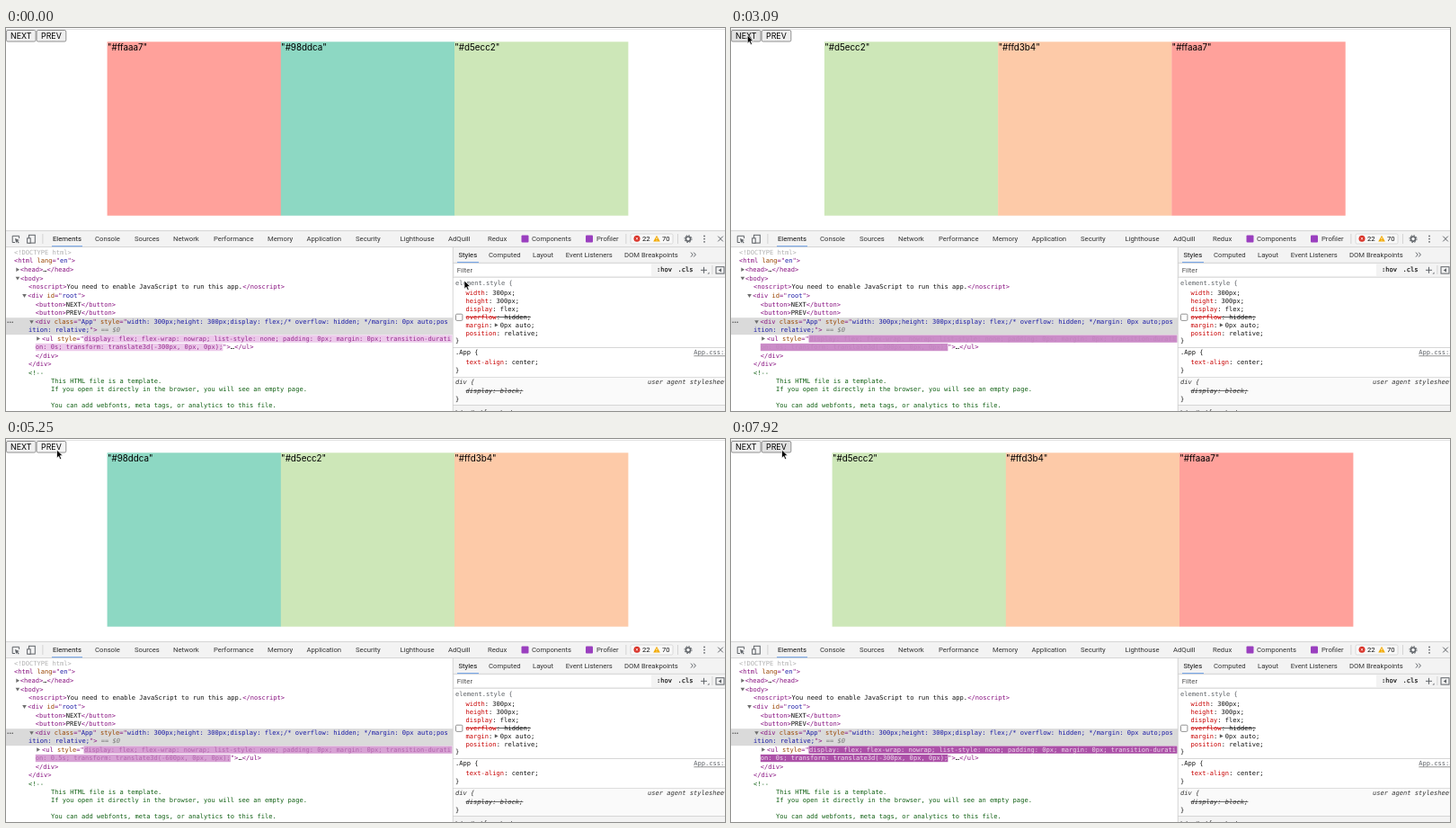
Recreate the animation shown at these times as an HTML page. Size 800 by 426 pixels, loop 8 s.

```html
<!DOCTYPE html>
<html lang="en">
<head>
<meta charset="utf-8">
<title>Carousel in the inspector</title>
<style>
html, body { margin: 0; width: 100%; height: 100%; overflow: hidden; background: #fff; }
svg { display: block; width: 800px; height: 426px; }
text { white-space: pre; }
.m { font: 7.07px "DejaVu Sans Mono", monospace; }
.u { font: 7.7px Roboto, sans-serif; fill: #333; }
.b { font: 8.8px Inter, sans-serif; fill: #000; }
.l { font: 9.8px Inter, sans-serif; fill: #000; }
.k { fill: #111; }
.p { fill: #881280; }
.n { fill: #994500; }
.v { fill: #1a1aa6; }
.g { fill: #b0b0b0; }
.e { fill: #777; font-style: italic; }
.c { fill: #0f5f12; }
.r { fill: #c80000; }
.s { fill: #5f6368; }
.i { font-style: italic; fill: #333; }
.x { text-decoration: line-through; }
.o { fill: none; stroke: #5f6368; stroke-width: 1; }
</style>
</head>
<body>
<svg id="stage" viewBox="0 0 800 426" xmlns="http://www.w3.org/2000/svg"></svg>
<script>
const stage = document.getElementById('stage');
const LOOP = 8000, SLIDE = 500, PRESS = 185, LAG = 230;
const SIDE = 193.2, LEFT = 112.6, CHAR = 7.07 * 0.602;
const ITEMS = [['#ffaaa7', '#ffa19b'], ['#98ddca', '#8dd8c3'], ['#d5ecc2', '#cde7b8'], ['#ffd3b4', '#fdcaa8']];
// [start, direction]: 1 is NEXT, -1 is PREV
const CLICKS = [[1220, 1], [2123, 1], [3060, 1], [3770, 1], [4680, 1], [5375, -1], [6220, -1], [7140, -1]];

const esc = s => s.replace(/&/g, '&amp;').replace(/</g, '&lt;');
const text = (cls, x, y, s, more = '') => `<text class="${cls}" x="${x}" y="${y}" ${more}>${esc(s)}</text>`;
const rect = (x, y, w, h, fill, more = '') => `<rect x="${x}" y="${y}" width="${w}" height="${h}" fill="${fill}" ${more}/>`;
const hline = (x, y, w, c = '#ccc') => rect(x, y, w, 0.8, c);
const vline = (x, y, h, c = '#ccc') => rect(x, y, 0.8, h, c);
// runs are split by "|"; the first letter of each is its colour class
const code = (x, cy, runs, more = '') => `<text class="m" x="${x}" y="${cy + 2.4}">` +
  runs.split('|').map(r => `<tspan class="${r[0]} ${more}">${esc(r.slice(1))}</tspan>`).join('') + '</text>';
const right = (x, y) => `<path d="M${x} ${y - 2.3}l3.8 2.3l-3.8 2.3z" fill="#6e6e6e"/>`;
const down = (x, y) => `<path d="M${x} ${y - 1.7}h4.6l-2.3 3.8z" fill="#6e6e6e"/>`;
const button = (id, x, s) => rect(x + 0.4, 2.5, 32.7, 12.5, '#efefef', `id="${id}" rx="1.6" stroke="#767676" stroke-width=".8"`) +
  text('b', x + 16.7, 12, s, 'text-anchor="middle"');
const underline = (x, y, w) => rect(x, y, w, 1, '#6b9fe6');

function page() {
  return rect(0, 0, 800, 426, '#fff') + hline(0, 1.2, 800, '#dcdcdc') +
    '<g id="list">' + [0, 1, 2].map(i =>
      rect(i * SIDE, 15.3, SIDE + 0.2, SIDE + 0.2, '#fff', 'class="tile"') +
      text('l', i * SIDE + 0.3, 25.4, '', 'data-tile="1"')).join('') + '</g>' +
    button('next', 0, 'NEXT') + button('prev', 33.7, 'PREV');
}

function toolbar() {
  const tabs = [[52, 'Elements'], [99, 'Console'], [143, 'Sources'], [186, 'Network'], [231, 'Performance'],
    [291, 'Memory'], [334.5, 'Application'], [389, 'Security'], [438.5, 'Lighthouse'], [492, 'AdQuill'],
    [536, 'Redux'], [585, 'Components'], [657, 'Profiler']];
  return rect(0, 225.5, 800, 18, '#f3f3f3') + hline(0, 225.2, 800) + hline(0, 243.2, 800) +
    '<path class="o" d="M10 238.5H7.2V231.3H14.6V234"/><path d="M10 234l5 2l-2.1.8l1.8 1.9l-.9.8l-1.8-1.9l-.8 1.8z" fill="#5f6368"/>' +
    '<rect class="o" x="25.5" y="230.3" width="6.8" height="8.8"/>' +
    rect(23.6, 233.8, 3.6, 5.4, '#f3f3f3', 'stroke="#5f6368"') +
    vline(40.5, 229, 11) +
    tabs.map(([x, s]) => text(x === 52 ? 'u k' : 'u', x, 237.2, s)).join('') +
    underline(51, 242.2, 34) +
    rect(573.5, 230.5, 8, 8, '#9a3fbf', 'rx="1"') + rect(645, 230.5, 8, 8, '#9a3fbf', 'rx="1"') +
    vline(689.5, 229, 11) + rect(695, 229, 47, 11, '#f8f8f8', 'rx="1.5" stroke="#cfcfcf" stroke-width=".7"') +
    '<circle cx="702" cy="234.3" r="3.5" fill="#d93025"/><path d="M700.7 233l2.6 2.6m0-2.6l-2.6 2.6" stroke="#fff" stroke-width=".8"/>' +
    text('u k', 708, 237.2, '22') +
    '<path d="M724 230.8l3.8 6.7h-7.6z" fill="#f2a900"/><path d="M724 233v2.2m0 .7v.8" stroke="#fff" stroke-width=".8"/>' +
    text('u k', 730, 237.2, '70') + vline(747, 229, 11) +
    '<circle class="o" cx="759" cy="234.6" r="2.6" style="stroke-width:1.6"/><circle class="o" cx="759" cy="234.6" r="4" stroke-dasharray="1.6 1.54"/>' +
    [231.4, 234.6, 237.8].map(y => `<circle cx="777" cy="${y}" r=".9" fill="#5f6368"/>`).join('') +
    '<path class="o" d="M792.2 231.6l5.6 5.8m0-5.8l-5.6 5.8"/>';
}

function elements() {
  return rect(0, 322.2, 497, 19, '#dadada') +
    [2.2, 4.7, 7.2].map(x => `<circle cx="${x}" cy="327.3" r=".8" fill="#555"/>`).join('') +
    code(9, 249.5, 'g<!DOCTYPE html>') +
    code(9, 259, 'p<html |nlang|p="|ven|p">') +
    right(11.3, 268.8) + code(15.7, 268.8, 'p<head>|k…|p</head>') +
    down(10.6, 278.5) + code(16, 278.5, 'p<body>') +
    code(25, 288, 'p<noscript>|kYou need to enable JavaScript to run this app.|p</noscript>') +
    down(18.2, 297.8) + code(24.3, 297.8, 'p<div |nid|p="|vroot|p">') +
    code(32.8, 307.4, 'p<button>|kNEXT|p</button>') +
    code(32.8, 317, 'p<button>|kPREV|p</button>') +
    down(26.2, 327) +
    code(32.6, 327, 'p<div |nclass|p="|vApp|p" |nstyle|p="|vwidth: 300px;height: 300px;display: flex;/* overflow: hidden; */margin: 0px auto;pos') +
    code(25, 336, 'vition: relative;|p">|e == $0') +
    right(34.2, 345.5) + code(40, 345.5, 'p<ul |nstyle|p="') +
    rect(86.5, 341.5, 410, 8.3, '#fff', 'class="glow"') + rect(32.8, 350.9, 10, 8.3, '#fff', 'class="glow" id="glow2"') +
    text('m', 86.9, 347.9, 'display: flex; flex-wrap: nowrap; list-style: none; padding: 0px; margin: 0px; transition-durati', 'data-flash="1"') +
    text('m', 32.8, 357.2, '', 'data-flash="1" id="style2"') +
    '<g id="tail">' + code(0, 354.8, 'p">|k…|p</ul>') + '</g>' +
    code(32.8, 364.4, 'p</div>') + code(25, 374, 'p</div>') + code(25, 383.5, 'c<!--') +
    code(50, 393, 'cThis HTML file is a template.') +
    code(50, 402, 'cIf you open it directly in the browser, you will see an empty page.') +
    code(50, 419.8, 'cYou can add webfonts, meta tags, or analytics to this file.');
}

function styles() {
  const tabs = [[503.5, 'Styles'], [537, 'Computed'], [586, 'Layout'], [622.7, 'Event Listeners'], [688, 'DOM Breakpoints']];
  const props = ['rwidth|k: 300px;', 'rheight|k: 300px;', 'rdisplay|k: flex;', 'roverflow|k: hidden;', 'rmargin|k:  0px auto;', 'rposition|k: relative;'];
  return rect(497, 244, 303, 182, '#fff') + rect(497, 244, 303, 33, '#f3f3f3') +
    tabs.map(([x, s], i) => text(i ? 'u' : 'u k', x, 254.8, s)).join('') +
    '<path class="o" d="M762 249.6l2.2 2.5l-2.2 2.5m3.2-5l2.2 2.5l-2.2 2.5"/>' +
    hline(497, 260.8, 303) + underline(502, 260.1, 24) +
    rect(499, 262.5, 219, 13.3, '#fff') + text('u', 501.8, 271.9, 'Filter', 'fill-opacity=".85"') +
    text('m k', 724, 271.4, ':hov', 'stroke="#222" stroke-width=".2"') + text('m k', 747.5, 271.4, '.cls', 'stroke="#222" stroke-width=".2"') +
    '<path class="o" d="M773 269.3h7m-3.5-3.5v7"/><path d="M782.5 273.5v-2l-2 2z" fill="#5f6368"/>' +
    vline(785.5, 264, 10) +
    '<rect class="o" x="790" y="265.7" width="9" height="7.4"/><path d="M796 267.2v4.4l-3.4-2.2z" fill="#5f6368"/>' +
    hline(497, 276.8, 303) +
    code(500, 284, 'selement.style {') +
    props.map((p, i) => code(511.6, 294.3 + i * 9, p, i === 3 ? 'x' : '')).join('') +
    '<path d="M543.8 328.2l3.8 2.2l-3.8 2.2z" fill="#555"/>' +
    rect(500.5, 318.2, 7.4, 7.2, '#fff', 'rx="1.2" stroke="#767676" stroke-width=".8"') +
    code(500, 348, 'k}') + hline(497, 355, 303) +
    code(500, 361, 'k.App {') + code(765.3, 361, 'sApp.css:3') + hline(765.3, 364.4, 35, '#777') +
    code(511.6, 371.2, 'rtext-align|k: center;') + code(500, 380.3, 'k}') +
    hline(497, 388, 303) + rect(497, 388.8, 303, 30.4, '#fafafa') +
    code(500, 393.6, 'idiv {') + code(714, 393.6, 'iuser agent stylesheet') +
    code(511.6, 403.5, 'rdisplay|k: block;', 'i x') + code(500, 412.3, 'k}') +
    hline(497, 419.2, 303) + rect(497, 420, 303, 6, '#f3f3f3') + text('u', 500, 430, 'Inherited from body') +
    vline(496.8, 244, 182);
}

stage.innerHTML = page() + toolbar() + elements() + styles() +
  '<path id="cursor" d="M0 0V9.2L2.1 7.2L3.6 10.6L5.2 9.9L3.7 6.6H6.6Z" fill="#000" stroke="#fff" stroke-width=".7"/>';

const id = s => document.getElementById(s);
const all = s => [...stage.querySelectorAll(s)];
const list = id('list'), cursor = id('cursor'), style2 = id('style2'), glow2 = id('glow2'), tail = id('tail');
const tiles = all('.tile'), labels = all('[data-tile]'), glows = all('.glow'), flashes = all('[data-flash]');

const clamp = x => Math.min(1, Math.max(0, x));
const mix = (a, b, p) => a.map((v, i) => v + (b[i] - v) * p);
const rgb = c => `rgb(${c.map(Math.round)})`;
function bezier(x1, y1, x2, y2) {
  const at = (a, b, s) => 3 * a * s * (1 - s) ** 2 + 3 * b * s * s * (1 - s) + s ** 3;
  return x => {
    if (x <= 0 || x >= 1) return clamp(x);
    let lo = 0, hi = 1;
    for (let i = 0; i < 24; i++) {
      const mid = (lo + hi) / 2;
      if (at(x1, x2, mid) < x) lo = mid; else hi = mid;
    }
    return at(y1, y2, lo);
  };
}
const ease = bezier(0.25, 0.1, 0.25, 1), fade = bezier(0, 0, 0.2, 1), glide = bezier(0.42, 0, 0.58, 1);

// style changes as the inspector shows them
const REST = 'on: 0s; transform: translate3d(-300px, 0px, 0px);';
const moving = dir => `on: 0.5s; transform: translate3d(${dir > 0 ? '-600px' : '0px'}, 0px, 0px);`;
const edits = [[-650, REST]];
for (const [at, dir] of CLICKS) edits.push([at + LAG, moving(dir)], [at + SLIDE + LAG, REST]);

const WHITE = [255, 255, 255], TAG = [136, 18, 128], VALUE = [26, 26, 166];
const HOT = [158, 54, 153], PALE = [245, 219, 244];

function drawList(t) {
  let first = 0, shift = 0;
  for (const [at, dir] of CLICKS) {
    if (t >= at + SLIDE) first += dir;
    else if (t >= at) shift = -dir * SIDE * ease((t - at) / SLIDE);
  }
  list.setAttribute('transform', `translate(${LEFT + shift} 0)`);
  tiles.forEach((tile, i) => {
    const [name, fill] = ITEMS[(first + i + 8) % 4];
    tile.setAttribute('fill', fill);
    labels[i].textContent = `"${name}"`;
  });
}

function drawFlash(t) {
  const [at, line] = edits.filter(e => e[0] <= t).pop();
  const a = fade(clamp((t - at) / 1120)), b = fade(clamp((t - at - 1120) / 280));
  const ink = rgb(b ? mix(TAG, VALUE, b) : mix(WHITE, TAG, a));
  const back = rgb(b ? mix(PALE, WHITE, b) : mix(HOT, PALE, a));
  flashes.forEach(f => f.style.fill = ink);
  glows.forEach(g => g.setAttribute('fill', back));
  style2.textContent = line;
  glow2.setAttribute('width', line.length * CHAR);
  tail.setAttribute('transform', `translate(${32.8 + line.length * CHAR} 0)`);
}

function drawPointer(t) {
  const toNext = glide(clamp((t - 200) / 800)), toPrev = glide(clamp((t - 4980) / 210));
  const [x, y] = mix(mix([510, 281], [18.3, 8], toNext), [56.5, 12], toPrev);
  cursor.setAttribute('transform', `translate(${x} ${y})`);
  const pressed = CLICKS.some(([at]) => t >= at - PRESS && t < at);
  [['next', 0], ['prev', 33.7]].forEach(([name, left]) => {
    const over = y < 15 && x >= left && x < left + 33.5;
    id(name).setAttribute('fill', !over ? '#efefef' : pressed ? '#f5f5f5' : '#e2e2e2');
  });
}

function draw(t) {
  drawList(t);
  drawFlash(t);
  drawPointer(t);
}

const start = performance.now();
function tick() {
  draw((performance.now() - start) % LOOP);
  requestAnimationFrame(tick);
}
tick();
</script>
</body>
</html>
```
